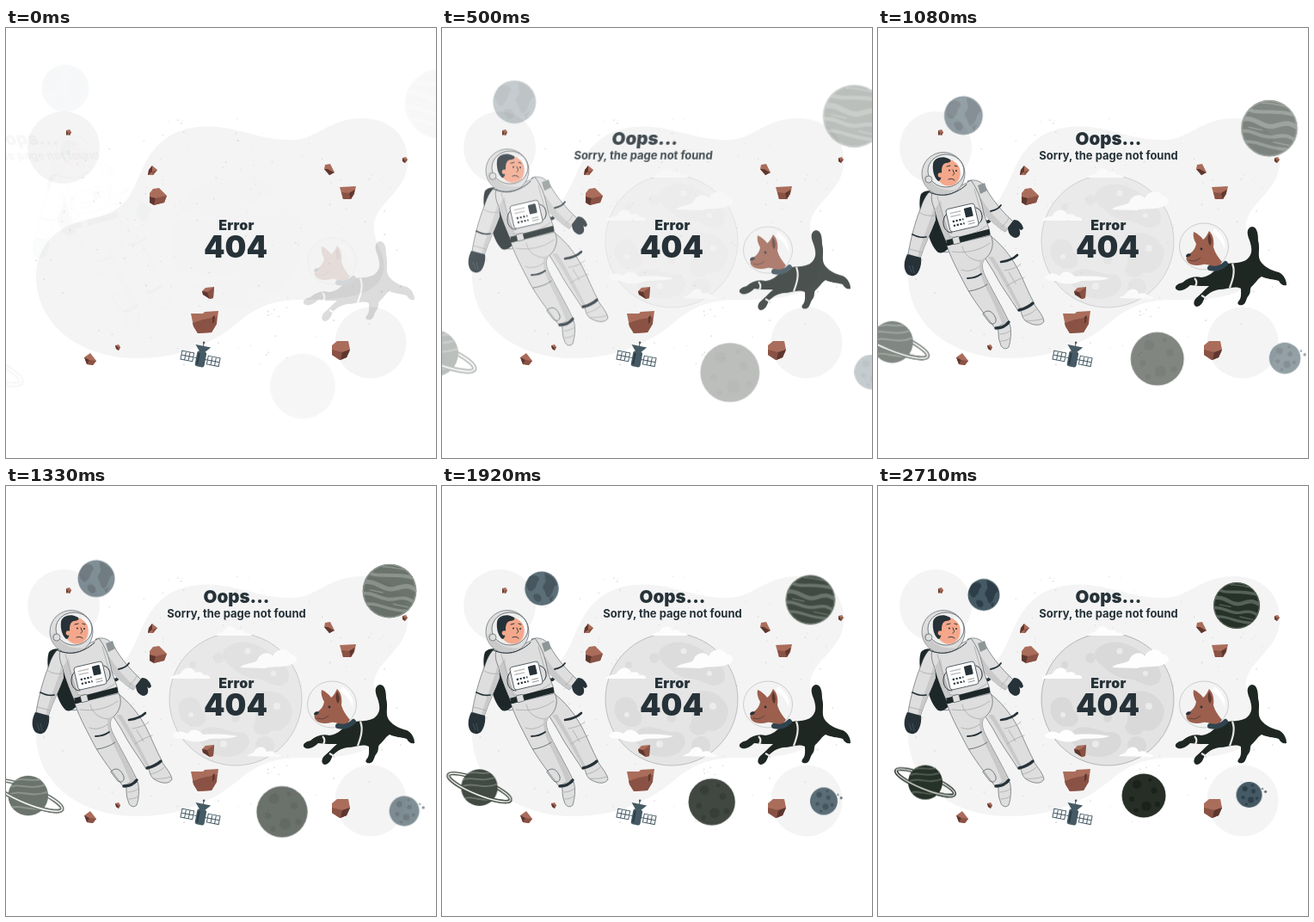
Animation of 500 by 500 pixels, one loop 2.75 s. Source, as an HTML page:

```html
<!DOCTYPE html>
<html lang="en">
<head>
<meta charset="utf-8">
<title>Error 404</title>
<style>
  html, body { margin: 0; width: 100%; height: 100%; overflow: hidden; background: #fff; }
  svg { display: block; width: 100%; height: 100%; }
  text { font-family: Inter, Lato, sans-serif; fill: #263238; text-anchor: middle; }

  .planet, .moon, .walker, .dog, .title { animation: 2750ms linear infinite; }
  .planet { animation-name: approach; }
  .moon { animation-name: appear; }
  .walker { animation-name: drop; }
  .dog { animation-name: rise; }
  .title { animation-name: rush; }

  @keyframes approach {
    from { transform: translate(var(--x), var(--y)) scale(1.49); opacity: .04; animation-timing-function: ease-out; }
    to { transform: none; opacity: 1; }
  }
  @keyframes appear {
    from { opacity: .01; animation-timing-function: ease-out; }
    to { opacity: 1; }
  }
  @keyframes drop {
    from { transform: translateY(-20px); opacity: .02; animation-timing-function: ease-out; }
    29%, to { transform: none; opacity: 1; }
  }
  @keyframes rise {
    from { transform: translateY(17px); opacity: .16; animation-timing-function: ease-out; }
    32%, to { transform: none; opacity: 1; }
  }
  @keyframes rush {
    from { transform: translateX(-243px) skewX(19deg); opacity: .04; }
    21.1% { transform: translateX(0) skewX(-10deg); opacity: 1; }
    28.4% { transform: translateX(0) skewX(2deg); opacity: 1; }
    35.6%, to { transform: translateX(0) skewX(0); opacity: 1; }
  }

  .bg { fill: #f4f4f4; }
  .ink { fill: #263238; }
  .suit { fill: #dedede; stroke: #263238; stroke-width: .5; stroke-linejoin: round; }
  .shade { fill: #c9c9c9; }
  .line { fill: none; stroke: #263238; stroke-width: .6; stroke-linecap: round; }
  .band { fill: none; stroke: #263238; stroke-width: 3.4; stroke-linecap: round; }
  .seam { fill: none; stroke: #a9a9a9; stroke-width: .8; stroke-linecap: round; }
  .lit { fill: #aa6d5b; }
  .mid { fill: #8a5244; }
  .dim { fill: #5d372f; }
</style>
</head>
<body>
<svg viewBox="0 0 500 500">
  <defs>
    <clipPath id="c77"><circle r="77"/></clipPath>
    <clipPath id="c27"><circle r="26"/></clipPath>
    <clipPath id="c20"><circle r="20"/></clipPath>
    <clipPath id="c18"><circle r="18.5"/></clipPath>
  </defs>

  <path class="bg" d="M35 287C36 258 52 239 75 229C100 219 126 221 143 196C158 172 160 147 186 128C210 112 240 112 268 119C297 126 325 135 350 127C372 118 385 105 414 105C447 105 469 126 467 159C465 190 431 203 428 228C426 250 443 262 439 283C433 311 395 316 350 316C318 315 297 321 275 338C250 360 212 384 152 384C85 384 34 344 35 287Z"/>
  <circle class="bg" cx="67" cy="139" r="42"/>
  <circle class="bg" cx="424" cy="366" r="41.5"/>
  <g id="stars" fill="#e0e0e0"></g>

  <g transform="translate(267 248)"><g class="moon">
    <circle r="77" fill="#e3e3e3"/>
    <g clip-path="url(#c77)" fill="#d9d9d9">
      <path d="M-8-62C8-72 28-64 40-54C58-46 66-30 60-20C48-10 38-22 24-24C8-24 0-34-8-40C-16-48-18-56-8-62Z"/>
      <path d="M28-8C44-14 62-4 66 12C66 28 54 40 42 36C34 46 22 42 20 32C28 24 18 6 28-8Z"/>
      <path d="M-64 2C-52-8-40 0-40 12C-30 20-34 32-46 32C-60 32-72 16-64 2Z"/>
      <path d="M-36 34C-20 28-8 40 4 38C18 38 20 54 8 62C-8 72-30 66-38 54C-46 46-44 38-36 34Z"/>
      <circle cx="34" cy="54" r="11"/><circle cx="-20" cy="-48" r="6"/><circle cx="-50" cy="-40" r="4"/>
      <circle cx="0" cy="22" r="5"/><circle cx="-16" cy="12" r="3"/>
      <g fill="#ebebeb"><circle cx="14" cy="-56" r="3.5"/><circle cx="48" cy="8" r="4"/><circle cx="-14" cy="52" r="4"/><circle cx="44" cy="-30" r="3"/><circle cx="-52" cy="18" r="3"/></g>
    </g>
    <circle r="77" fill="none" stroke="#8d9290" stroke-width=".6"/>
    <g fill="#fff">
      <path d="M-77-24C-72-30-66-28-64-30C-60-38-50-39-47-31C-42-33-38-31-37-28C-32-29-29-26-30-24Z"/>
      <path d="M-24-74C-20-78-16-77-14-79C-10-86-2-87 1-80C6-82 10-80 11-77C16-78 20-75 18-74Z"/>
      <path d="M5-37C12-43 20-41 25-45C28-55 40-56 43-50C48-60 60-60 64-52C72-52 73-44 68-42C60-36 40-39 34-36Z"/>
      <path d="M-73 42C-68 35-60 38-56 40C-50 32-42 36-38 41C-20 40-8 41 2 43C-8 47-20 45-30 46C-44 52-54 49-60 46C-66 46-72 46-73 42Z"/>
      <path d="M13 66C18 62 20 64 22 60C26 54 34 54 36 61C42 59 46 61 47 64C54 63 54 67 50 67Z"/>
    </g>
  </g></g>

  <g transform="translate(123 126.5)"><g class="planet" style="--x:-54px;--y:-56.5px">
    <circle r="18.5" fill="#455a64"/>
    <g clip-path="url(#c18)" fill="#2d3e48">
      <path d="M-14-13C-8-16-2-14-3-9C-7-6-5-1-9 1C-12 6-16 1-17-4Z"/>
      <path d="M3-17C9-16 16-10 17-4C12-3 13 4 9 9C4 12 5 4 2 1C-1-3 6-6 4-10Z"/>
      <path d="M-9 7C-4 4 1 8-1 13C-4 17-9 13-9 7ZM8 11L13 8L10 15Z"/>
    </g>
  </g></g>

  <g transform="translate(417 139)"><g class="planet" style="--x:87px;--y:-51px">
    <circle r="27" fill="#263228"/>
    <g clip-path="url(#c27)" transform="rotate(12)" fill="none" stroke="#566159" stroke-width="3.4">
      <path d="M-28-15C-14-8-2-21 28-17"/>
      <path d="M-28-3C-14-9-6 3 6-4S20-8 28-6" stroke-width="4.5"/>
      <path d="M-28 9C-16 3-6 12 6 7S20 4 28 6"/>
      <path d="M-22 18C-8 13 0 20 22 16" stroke-width="3"/>
      <path d="M-12-22C-4-25 6-23 14-24M-20 3H-6M6 12H22" stroke-width="1.3"/>
    </g>
    <circle r="26.2" fill="none" stroke="#6c766e" stroke-width=".8"/>
  </g></g>

  <g transform="translate(309 360)"><g class="planet" style="--x:36px;--y:56.5px">
    <circle r="25.5" fill="#262e26"/>
    <g fill="#1b221c">
      <circle cx="-8" cy="-13" r="5"/><circle cx="12" cy="-6" r="3.5"/><circle cx="-14" cy="4" r="3"/>
      <circle cx="3" cy="12" r="5.5"/><circle cx="16" cy="10" r="3"/><circle cx="7" cy="-18" r="2"/><circle cx="-9" cy="17" r="2.5"/>
    </g>
  </g></g>

  <g transform="translate(55 344.5)"><g class="planet" style="--x:-88px;--y:47px">
    <g transform="rotate(22)" fill="none">
      <ellipse rx="36.5" ry="8" stroke="#263228" stroke-width="4"/>
      <ellipse rx="36.5" ry="8" stroke="#fff" stroke-width="1.3"/>
    </g>
    <circle r="20" fill="#263228"/>
    <g clip-path="url(#c20)" fill="none" stroke="#5a655c" stroke-width="1.6">
      <path d="M-20-8C-8-14 0-4 20-12M-20-1C-6-7 2 3 20-4M-20 13C-8 7 4 18 20 11M-14-15C-4-19 4-13 14-17"/>
    </g>
    <g transform="rotate(22)" fill="none">
      <path d="M-36.5 0A36.5 8 0 0 0 36.5 0" stroke="#263228" stroke-width="4"/>
      <path d="M-36.5 0A36.5 8 0 0 0 36.5 0" stroke="#fff" stroke-width="1.3"/>
    </g>
  </g></g>

  <g transform="translate(431.5 359)"><g class="planet" style="--x:95px;--y:57px">
    <circle r="15" fill="#455a64"/>
    <g fill="#2d3e48">
      <circle cx="-5" cy="-7" r="3"/><circle cx="5" cy="-4" r="2.4"/><circle cx="-7" cy="3" r="2"/>
      <circle cx="2" cy="6" r="3.4"/><circle cx="9" cy="4" r="1.8"/><circle cx="4" cy="-11" r="1.4"/><circle cx="-3" cy="11" r="1.4"/>
    </g>
    <g fill="#455a64"><circle cx="15.5" cy="-7" r="1"/><circle cx="19" cy="-3.5" r="1.4"/></g>
  </g></g>

  <g id="rocks"></g>

  <g transform="translate(226.5 384.5) rotate(11)" fill="#455a64">
    <path d="M-9-15L9-15L3-8H-3ZM-.5-19H.5V-14H-.5Z"/>
    <circle cy="-19" r="1.3"/>
    <rect x="-5.5" y="-8.5" width="11" height="18" rx="2.5"/>
    <rect x="-4" y="-6" width="2" height="13" fill="#2d3e48"/>
    <path d="M-23-5H-9V5H-23ZM-18.3-5V5M-13.7-5V5M-23 0H-5M8-5H22V5H8ZM12.7-5V5M17.3-5V5M5 0H22" fill="none" stroke="#455a64"/>
  </g>

  <g class="walker">
    <path fill="#1d2728" d="M50 193C56 187 66 189 70 194L86 250C82 258 76 263 70 261C64 256 60 246 58 238C50 226 46 204 50 193Z"/>
    <path class="line" d="M118 198C128 202 135 214 131 222C129 227 124 226 122 222" style="stroke-width:3.5"/>
    <path class="line" d="M70 256C77 265 88 260 88 252"/>

    <path class="suit" d="M131 242C142 250 154 264 163 281C170 295 175 308 181 319L163 329C153 313 143 300 137 288C132 279 126 270 121 262Z"/>
    <path class="shade" d="M128 266C138 280 150 302 164 327L167 326C158 308 146 285 134 266Z"/>
    <path class="suit" d="M166 328L181 320C185 327 192 334 193 341C190 347 181 346 174 342C169 340 167 334 166 328Z"/>
    <path class="seam" d="M168 335C174 334 180 331 184 327M171 340C178 341 186 340 192 338"/>
    <path class="band" d="M164 328C170 327 177 323 180 320"/>
    <path class="band" d="M143 272C150 271 158 268 162 264" style="stroke-width:2.6"/>
    <path class="seam" d="M147 282C155 281 163 278 166 274M150 300C157 295 164 292 170 290M152 284L160 297"/>

    <path class="suit" d="M80 253L131 241C136 250 132 262 126 267C121 271 120 276 123 285C130 300 143 322 152 341L136 349C124 333 112 318 103 302C96 288 86 271 80 253Z"/>
    <path class="shade" d="M119 270C115 283 124 298 132 315C138 327 142 338 145 345L151 342C142 322 130 300 123 286C120 277 121 271 126 267Z"/>
    <path class="suit" d="M139 349L153 344C156 352 154 365 152 371C148 375 143 372 142 366C139 359 141 354 139 349Z"/>
    <path class="seam" d="M142 356C147 356 151 354 154 352M143 364C147 364 151 363 153 361"/>
    <path class="band" d="M137 349C143 349 149 346 152 342"/>
    <path class="band" d="M104 291C110 291 116 289 120 286" style="stroke-width:1.8"/>
    <path class="line" d="M106 306C113 305 122 302 127 298M122 332C127 327 133 328 137 338C138 343 134 346 130 343Z"/>
    <path class="seam" d="M86 260C100 262 117 260 130 250M98 254C100 264 108 270 119 271M97 281C103 284 112 282 118 277"/>

    <path class="suit" d="M66 187C57 190 53 199 49 211C43 226 38 245 35 263L49 268C54 252 62 237 67 223Z"/>
    <path class="shade" d="M65 207C61 225 52 243 46 266L49 268C54 252 62 237 67 223Z"/>
    <path class="band" d="M40 240C46 243 52 244 56 243" style="stroke-width:1.8"/>
    <path class="seam" d="M36 257C42 258 47 260 51 261M49 215C54 218 60 219 65 218"/>
    <path class="ink" d="M34 263L50 267C51 274 49 280 46 285C43 289 38 289 34 286C30 281 29 273 34 263Z"/>
    <path d="M36 276L39 284M40 276L42 285" fill="none" stroke="#52646d" stroke-width=".6"/>

    <path class="suit" d="M104 178C113 175 121 178 126 187C132 198 142 211 157 225L148 237C136 230 126 219 117 205Z"/>
    <path class="shade" d="M114 204C122 219 136 230 148 237L151 233C140 225 128 212 120 198Z"/>
    <path class="band" d="M131 213C136 212 141 209 143 206" style="stroke-width:1.8"/>
    <path class="seam" d="M144 231C147 229 151 224 152 221"/>
    <path d="M116 183L124 180L127 189L119 193Z" fill="#8f9697"/>
    <path class="ink" d="M151 232L158 223C164 223 168 228 169 233C167 236 165 235 164 233C166 238 166 243 160 244C154 243 151 238 151 232Z"/>

    <path class="suit" d="M64 189C76 190 95 186 108 177C118 190 121 205 123 216C126 225 129 232 130 237L80 250C76 240 69 225 66 211C62 203 61 195 64 189Z"/>
    <path class="shade" d="M66 211C69 225 76 240 80 250L88 248C79 232 75 214 73 200Z"/>
    <path class="seam" d="M69 196L82 240M112 187L122 222M83 243C97 244 113 240 126 230"/>
    <path d="M80 250L130 237" stroke="#1d2728" stroke-width="6.5"/>
    <g transform="translate(91 247) rotate(-14)"><rect x="-4" y="-4" width="8" height="8" rx="1" class="suit" fill="#fff"/></g>
    <path class="line" d="M80 216C73 222 75 238 86 238M114 209C124 212 122 226 117 227" style="stroke-width:1"/>
    <g transform="translate(98 220.5) rotate(-13)">
      <rect x="-17" y="-13.5" width="34" height="27" rx="3" fill="#fff" stroke="#263238" stroke-width=".7"/>
      <rect x="4" y="-10" width="9" height="11" rx="1" class="ink"/>
      <path d="M-13-8H0M-13-4H-1" stroke="#bbb" stroke-width="1.4"/>
      <path d="M-12 2H1M-12 7H1" stroke="#263238" stroke-width="2.2" stroke-dasharray="2.2 1.7"/>
      <path d="M5 6H13M5 9H13" stroke="#999"/>
    </g>

    <circle cx="76" cy="169.5" r="25" class="suit"/>
    <path class="shade" d="M52 175C56 192 76 199 92 188C78 190 62 186 57 170Z"/>
    <ellipse cx="79" cy="166" rx="21" ry="19" fill="#eeeeee" stroke="#263238" stroke-width=".6"/>
    <path d="M69 154C78 150 92 153 95 163C97 172 94 181 86 183C80 185 73 182 70 176Z" fill="#f5a78b"/>
    <path class="ink" d="M64 158C65 151 75 148 82 152C86 153 85 157 79 157C75 158 74 162 74 167C74 173 73 178 70 178C65 174 63 165 64 158Z"/>
    <circle cx="72.5" cy="171" r="2.8" fill="#f5a78b"/>
    <path class="line" d="M80 161L84 160M89 160L92 161M87 165C88 168 90 170 87 171M82 176C84 175 87 175 89 177" style="stroke-width:1"/>
    <circle class="ink" cx="83" cy="165.5" r="1"/><circle class="ink" cx="91" cy="166" r="1"/>
    <path d="M90 153C97 157 100 164 98 172C96 164 94 158 88 155Z" fill="#fff"/>
    <circle class="suit" cx="59" cy="176" r="4"/>
    <path class="line" d="M58 190C70 197 88 196 103 182" style="stroke-width:1"/>
  </g>

  <g class="dog">
    <ellipse cx="379" cy="254" rx="28.5" ry="27" fill="#f3f3f3" stroke="#b8bebe" stroke-width=".7"/>
    <path fill="#1f2723" d="M397 277C405 271 420 276 429 269C436 263 435 256 432 247C428 238 429 232 435 231C441 231 442 240 442 247C445 257 440 266 446 273C451 279 458 282 466 284C472 287 475 293 475 299C471 300 468 298 466 294C459 292 452 292 446 289C441 292 439 297 434 301C432 304 434 307 431 311C428 314 428 321 424 322C420 323 417 321 419 318C423 314 422 309 422 303C414 299 406 304 397 304C390 305 385 308 380 313C378 318 376 324 370 324C366 322 367 317 370 314C375 310 379 305 385 300C378 300 370 300 363 299C358 304 350 308 346 303C345 299 350 297 354 296C361 290 368 288 376 290C384 289 389 285 397 277Z"/>
    <path d="M412 274C416 283 412 294 409 302M368 291C371 294 371 297 369 300M376 311C379 312 381 314 382 316" fill="none" stroke="#e6e6e6" stroke-width="2.2"/>
    <path class="mid" d="M367 237C372 239 376 243 378 246C381 244 383 240 385 236C390 241 391 248 390 255C392 262 396 267 400 272L393 281C388 276 383 274 378 275C371 277 363 276 360 272C357 268 359 264 363 262C367 259 369 256 370 251C367 246 366 241 367 237Z" style="fill:#9c5f4d"/>
    <path d="M385 239C388 244 389 250 386 253C383 249 383 243 385 239Z" class="dim"/>
    <path class="ink" d="M358 266C358 263 361 261 364 263C364 265 361 267 358 266Z"/>
    <circle class="ink" cx="376" cy="257" r="1.4"/>
    <path class="line" d="M362 270C367 272 372 270 375 267"/>
    <path d="M391 233C400 239 405 248 403 257C400 249 396 243 388 238Z" fill="#fff"/>
    <path d="M386 279C394 281 400 278 404 274" fill="none" stroke="#2f434e" stroke-width="6" stroke-linecap="round"/>
  </g>

  <text x="268" y="234.5" font-size="16" font-weight="900" letter-spacing=".3">Error</text>
  <text x="267" y="267" font-size="35" font-weight="900">404</text>
  <g transform="translate(268 141)"><g class="title">
    <text y="-5.5" font-size="20.5" font-weight="900">Oops...</text>
    <text y="12" font-size="13" font-weight="700">Sorry, the page not found</text>
  </g></g>
</svg>
<script>
  const add = (parent, tag, attrs) => {
    const el = document.createElementNS('http://www.w3.org/2000/svg', tag);
    for (const key in attrs) el.setAttribute(key, attrs[key]);
    parent.append(el);
  };

  let seed = 404;
  const rand = () => (seed = seed * 16807 % 2147483647) / 2147483647;
  const stars = document.getElementById('stars');
  for (let i = 0; i < 140; i++) {
    const a = rand() * Math.PI * 2, d = Math.sqrt(rand());
    add(stars, 'circle', { cx: 255 + 225 * d * Math.cos(a), cy: 252 + 152 * d * Math.sin(a), r: .5 + rand() * .6 });
  }

  // Each rock: outline, lower face, darkest face.
  const rocks = [
    ['70 119 74 118 76 121 74 125 70 124', '72 122 76 121 74 125', '70 119 72 122 71 125 70 124'],
    ['166 165 170 160 176 165 171 171 165 171', '170 167 176 165 171 171', '166 165 170 160 170 167 165 171'],
    ['167 192 171 187 178 186 187 195 184 203 172 206 167 203', '174 198 187 195 184 203 172 206', '167 196 174 198 172 206 167 203'],
    ['371 159 377 158 382 168 376 171 370 164', '374 164 382 168 376 171', '370 164 374 164 381 168 376 171'],
    ['388 185 407 184 405 193 401 199 392 199', '390 191 399 192 405 188 405 193 401 199 392 199', '399 192 406 188 401 199'],
    ['461 151 465 150 467 153 464 157 461 155', '463 153 467 153 464 157', '461 151 463 153 464 157 461 155'],
    ['228 306 232 302 242 301 241 314 237 315 229 310', '234 307 242 301 241 314 237 315', '228 306 234 307 237 315 229 310'],
    ['215 332 229 332 231 330 247 329 245 344 239 354 223 355 218 347', '217 343 229 339 245 336 245 344 239 354 223 355 218 347', '240 336 243 334 242 342 240 344'],
    ['91 383 98 378 105 387 101 392 94 391', '97 386 105 387 101 392 94 391', '91 383 97 386 94 391'],
    ['127 369 131 368 133 371 131 375 128 373', '130 371 133 371 131 375', '127 369 130 371 131 375 128 373'],
    ['379 369 385 364 398 364 400 374 396 383 388 386 379 380', '379 374 391 377 400 374 396 383 388 386 379 380', '391 377 400 374 396 383 389 386']
  ];
  const group = document.getElementById('rocks');
  for (const faces of rocks)
    faces.forEach((points, i) => add(group, 'polygon', { points, class: ['lit', 'mid', 'dim'][i] }));
</script>
</body>
</html>
```
